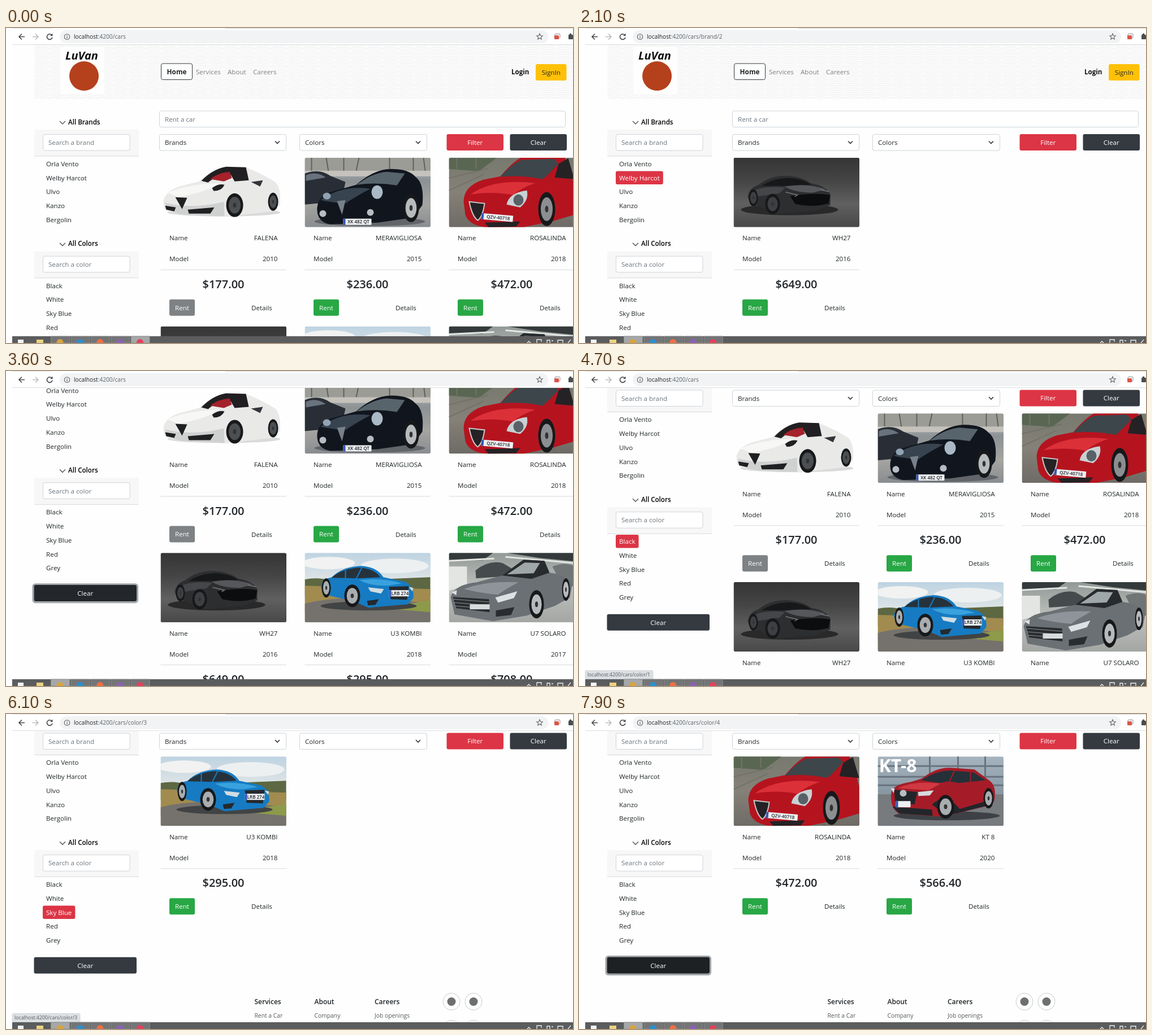
Recreate the animation shown at these times as an HTML page. Size 1003 by 558 pixels, loop 8 s.

```html
<!DOCTYPE html>
<html lang="en">
<head>
<meta charset="utf-8">
<title>Car rental</title>
<style>
  html, body { margin: 0; width: 100%; height: 100%; overflow: hidden; background: #fff; }
  svg { display: block; width: 1003px; height: 558px; font-family: "Open Sans", "Noto Sans", sans-serif; }
</style>
</head>
<body>
<svg id="stage" viewBox="0 0 1003 558" xmlns="http://www.w3.org/2000/svg"></svg>
<script>
const LOOP = 8000;
const INK = '#212529', MUTED = '#6c757d', RED = '#dc3545', DARK = '#343a40', GREEN = '#28a745';
const ROW = 24.75, CARD_W = 222.5, CARD_H = 123, PITCH = 298.7;

// Drawing helpers
const rect = (x, y, w, h, fill, r = 0, more = '') =>
  `<rect x="${x}" y="${y}" width="${w}" height="${h}" rx="${r}" fill="${fill}" ${more}/>`;
const oval = (x, y, rx, ry, fill, more = '') =>
  `<ellipse cx="${x}" cy="${y}" rx="${rx}" ry="${ry}" fill="${fill}" ${more}/>`;
const dot = (x, y, r, fill, more) => oval(x, y, r, r, fill, more);
const shape = (fill, d) => `<path d="${d}" fill="${fill}"/>`;
const line = (color, w, d) => `<path d="${d}" fill="none" stroke="${color}" stroke-width="${w}"/>`;
const text = (x, cy, s, { size = 11.6, fill = INK, weight = 400, anchor = 'start', more = '' } = {}) =>
  `<text x="${x}" y="${cy + size * 0.36}" font-size="${size}" fill="${fill}" font-weight="${weight}" text-anchor="${anchor}" ${more}>${s}</text>`;
const button = (x, y, w, label, fill, color = '#fff') =>
  rect(x, y, w, 29, fill, 3) + text(x + w / 2, y + 14.7, label, { fill: color, anchor: 'middle' });
const field = (x, y, w, label, color = MUTED) =>
  rect(x + .5, y + .5, w - 1, 28.5, '#fff', 3, 'stroke="#ced4da"') + text(x + 10, y + 15, label, { fill: color });
const chevron = (x, y, w, color, weight) =>
  line(color, weight, `M${x - w} ${y - w / 2}L${x} ${y + w / 2}L${x + w} ${y - w / 2}`);
const grad = (id, ...colors) => `<linearGradient id="${id}" x2="0" y2="1">` +
  colors.map((c, i) => `<stop offset="${i / (colors.length - 1)}" stop-color="${c}"/>`).join('') + '</linearGradient>';

const pen = document.createElement('canvas').getContext('2d');
const widthOf = s => {
  pen.font = '11.6px "Open Sans", "Noto Sans", sans-serif';
  return pen.measureText(s).width;
};

// Simplified car pictures, each 222.5 by 123
const wheel = (x, y, rx, ry, rim = '#a9adb0') =>
  oval(x, y, rx, ry, '#17181a') + oval(x, y, rx * .7, ry * .7, rim) + oval(x, y, rx * .2, ry * .2, '#333');
const plate = (x, y, w, s, turn = 0) =>
  `<g transform="translate(${x} ${y}) rotate(${turn})">` + rect(0, 0, w, 11, '#eef0f2', 1) +
  rect(0, 0, 4, 11, '#3557b5') + text(w / 2 + 2, 5.5, s, { size: 8, weight: 600, anchor: 'middle' }) + '</g>';
const back = fill => rect(0, 0, CARD_W, CARD_H, fill);

const photos = [
  () => back('#fdfefd') +
    oval(112, 97, 100, 7, '#d9dada') +
    shape('#e9e9e8', 'M5 76Q9 59 33 51L68 42Q92 20 116 16L151 17Q183 30 204 44Q214 58 211 83L197 95L121 104L44 101Q8 98 6 88Z') +
    shape('#cfd0d0', 'M8 80Q60 92 112 78L113 104L44 101Q9 98 8 80Z') +
    shape('#211f21', 'M72 41Q92 20 116 16L151 17L156 40L131 42L124 30Q98 31 84 44Z') +
    shape('#a5212b', 'M88 38Q100 27 122 25L126 36L112 42Z') +
    shape('#f7f7f6', 'M12 62Q45 47 103 45Q85 60 31 70Z') +
    shape('#1f2022', 'M26 70L47 71L38 91ZM8 85L27 88L24 95L10 92ZM48 92L95 88L88 99L50 99ZM91 54Q102 45 113 48Q108 59 94 59Z') +
    shape('#333538', 'M160 43L181 40L176 51Z') +
    wheel(131, 84, 15, 21, '#4c4f52') + wheel(199, 78, 9, 16, '#4c4f52'),
  () => back('url(#yard)') +
    rect(0, 0, CARD_W, 24, '#9b9c96') +
    line('#655f56', 2, 'M12 0V25M38 0L42 25M69 0V24M96 0L91 23M150 0V20M192 0V25M210 0L214 30') +
    rect(0, 23, CARD_W, 10, '#c4c2bb') +
    shape('#292e36', 'M0 28Q25 18 45 32L72 43L65 77L0 83Z') + shape('#69737e', 'M2 31Q20 23 37 35L2 41Z') +
    oval(115, 113, 98, 8, '#62656a') +
    shape('#11161e', 'M22 88Q24 66 52 59L91 48Q121 21 151 20Q183 19 196 34Q212 46 208 84L192 106L129 115L45 118Q20 113 22 88Z') +
    shape('#58646c', 'M92 48Q119 27 145 25L177 28L163 49Q127 43 92 48Z') +
    shape('#384350', 'M28 75Q65 48 116 55Q91 68 72 81Q45 79 28 75Z') +
    shape('#77818b', 'M57 77L72 75L66 101Z') +
    oval(128, 61, 10, 12, '#aab9c7') + oval(39, 68, 7, 6, '#91a2b3') + dot(32, 99, 6, '#b5bdc2') + dot(116, 97, 6, '#b5bdc2') +
    wheel(188, 89, 14, 25, '#b8bbbd') + plate(68, 108, 50, 'XK 482 QT'),
  () => back('url(#street)') +
    shape('#596752', 'M0 0H85L53 24L0 20Z') + line('#747168', 2, 'M0 58L61 30M0 36L70 19M14 0V22M48 0V20') +
    shape('#b5141f', 'M26 78Q26 50 61 39L91 33Q111 9 127 0H205L215 20L222 54V101L185 112L132 123H64Q35 119 29 101Z') +
    shape('#3d464a', 'M91 34Q111 11 128 4L186 2L194 10Q176 30 166 38Q126 30 91 34Z') +
    shape('#dc3039', 'M38 65Q79 36 153 45Q130 52 113 66Q75 59 38 65Z') +
    shape('#242225', 'M194 11L211 1L222 38L187 35ZM36 78L63 81Q60 104 51 111Q41 104 36 78ZM63 115L126 113L119 122L70 123Z') +
    line('#c6c7c8', 2, 'M36 78L63 81Q60 104 51 111Q41 104 36 78Z') +
    shape('#c9d0d2', 'M102 83Q106 62 138 58Q142 75 126 88Z') + oval(123, 75, 9, 10, '#596067') +
    wheel(173, 91, 15, 30, '#8c8f91') + plate(58, 98, 56, 'QZV-40718', 5),
  () => back('url(#studio)') +
    oval(99, 92, 86, 10, '#29292a') +
    shape('#2d2e30', 'M25 69Q27 54 44 48Q65 31 96 32Q122 34 136 45Q163 50 171 64L171 84L145 94L79 99L58 91L29 80Z') +
    shape('#17181a', 'M49 50Q72 35 101 36Q125 38 137 48L100 50Z') +
    shape('#56575a', 'M90 51Q130 44 163 56L140 62Q109 62 90 51Z') + shape('#444649', 'M28 62Q52 48 91 53L81 63L33 70Z') +
    shape('#0c0d0e', 'M100 68Q144 61 171 66L168 81Q140 89 109 82Z') +
    line('#77797c', 1.4, 'M92 61L113 66L108 69M154 57L169 60') +
    wheel(69, 82, 13, 18, '#3d3f42') + wheel(35, 71, 8, 15, '#3d3f42'),
  () => back('url(#sky)') +
    oval(42, 18, 47, 11, '#f1f2f1') + oval(159, 23, 60, 13, '#edf0f1') +
    shape('#5d6742', 'M0 47Q24 42 49 50L222 43V77H0Z') + shape('#a18b4f', 'M0 58L222 64V94L0 105Z') +
    shape('#75726d', 'M0 90Q68 71 222 90V123H0Z') + shape('#8d9a4a', 'M138 98L222 84V105Z') +
    oval(113, 94, 85, 8, '#414344') +
    shape('#167bc2', 'M28 58Q34 45 48 43Q65 25 99 23Q127 24 139 43L177 51Q194 59 192 80L182 91L113 97L87 86L33 73Z') +
    shape('#26323b', 'M47 44Q66 28 95 26Q122 27 134 43L93 45Z') + line('#167bc2', 2, 'M72 28V45M101 26L91 46') +
    shape('#39a1dd', 'M96 48Q137 43 172 54L147 58Q116 59 96 48Z') +
    shape('#25292d', 'M149 60L184 59L181 83L152 82ZM110 85L131 82L125 92L112 93Z') +
    shape('#d0dce2', 'M112 61L140 64L135 72L116 68ZM184 60L192 62L190 68Z') +
    wheel(84, 76, 14, 20) + wheel(38, 62, 8, 17) + plate(149, 66, 35, 'LRB 274'),
  () => back('url(#hall)') +
    shape('#343a3b', 'M0 0H78L60 13H0ZM103 0H222V15L161 9Z') + line('#e4e6e3', 3, 'M0 14L80 10M100 7L222 18') +
    shape('#454a4c', 'M47 31Q70 12 95 18L117 31L106 41L48 45Z') + shape('#707576', 'M183 24Q207 15 222 24V60L198 54Z') +
    shape('#e3e5e2', 'M0 24H32V57L0 67Z') +
    shape('#6b7075', 'M3 78Q10 56 49 52L94 40L132 12L169 14L177 35Q209 38 218 57L214 79L187 94L138 111L78 121L10 109Z') +
    shape('#272b2e', 'M94 40L132 12L169 14L178 35L146 46Z') + shape('#9fa7a9', 'M103 38L134 17L161 18L150 36Z') +
    shape('#8e9499', 'M27 64Q64 49 123 52Q100 64 87 74Q54 71 27 64Z') +
    shape('#2a2d30', 'M7 78L71 82L72 105L13 98ZM83 102L116 96L110 110L83 113Z') +
    line('#8d9296', 1, 'M8 82L71 87M9 88L71 93M11 94L72 99') +
    shape('#dce2e4', 'M82 79L121 68L115 80L87 88ZM5 70L14 66L13 75Z') + rect(37, 91, 35, 9, '#d8dbdc') +
    wheel(155, 91, 13, 25, '#b7babc') + wheel(207, 65, 7, 20, '#b7babc'),
  () => back('url(#city)') +
    line('#687480', 3, 'M0 17H222M0 36H222M0 51H222M92 0V55M142 0V40M190 0V58') + rect(0, 67, CARD_W, 56, '#777b7e') +
    text(2, 16, 'KT-8', { size: 32, fill: '#fff', weight: 700 }) + oval(122, 105, 94, 8, '#3d4145') +
    shape('#a51c28', 'M24 63Q29 49 59 45L78 39Q104 18 130 20L171 23L198 43Q211 53 206 79L192 88L115 107L37 101Q21 91 24 63Z') +
    shape('#263039', 'M77 42Q105 24 131 25L169 28L191 42L144 47L125 44L109 47Z') + line('#a51c28', 2, 'M136 24L126 46M164 27L164 46') +
    shape('#d03842', 'M35 56Q66 42 111 48L90 60Z') +
    shape('#22262a', 'M29 59L70 63L65 85L31 81ZM26 89L96 94L97 105L38 101ZM96 85Q120 62 145 93L192 79L194 87L121 105Z') +
    dot(45, 65, 6, '#b9bec2') + shape('#d6dbdf', 'M71 63L99 60L92 69L72 70ZM23 56L30 57L28 65Z') +
    wheel(120, 89, 15, 21) + wheel(196, 74, 9, 18) + plate(32, 79, 26, ''),
  () => back('url(#yard)') +
    oval(112, 101, 92, 8, '#55585b') +
    shape('#15181c', 'M20 70Q32 51 66 48Q91 23 132 24Q164 27 182 49Q207 56 205 84L187 98L44 103Q19 98 20 70Z') +
    shape('#53606a', 'M70 48Q94 28 130 28L166 47L112 52Z') + shape('#3a4046', 'M31 63Q64 50 108 57L84 68Z') +
    wheel(84, 90, 13, 18) + wheel(182, 84, 11, 17)
];

const cars = [
  ['FALENA', 2010, '177.00'], ['MERAVIGLIOSA', 2015, '236.00'], ['ROSALINDA', 2018, '472.00'],
  ['WH27', 2016, '649.00'], ['U3 KOMBI', 2018, '295.00'], ['U7 SOLARO', 2017, '708.00'],
  ['KT 8', 2020, '566.40'], ['BG 500', 2019, '944.00']
];
const brands = ['Orla Vento', 'Welby Harcot', 'Ulvo', 'Kanzo', 'Bergolin'];
const colors = ['Black', 'White', 'Sky Blue', 'Red', 'Grey'];
const all = cars.map((_, i) => i);

// Each step keeps the earlier values and changes a few
const steps = [
  [0, { path: '', list: all, scroll: 0, brand: -1, color: -1, overBrand: -1, overColor: -1,
        busy: false, bubble: '', bubbleW: 120, clear: DARK, ring: false, task: 4 }],
  [500, { overBrand: 1 }],
  [700, { path: '/brand/2', brand: 1, busy: true, bubble: 'brand/2', bubbleW: 350, task: 0 }],
  [1000, { busy: false, list: [3] }],
  [1700, { overBrand: 2, bubble: 'brand/3' }],
  [1800, { bubbleW: 120 }],
  [1900, { bubble: '' }],
  [2100, { overBrand: -1 }],
  [2700, { scroll: 120 }],
  [2800, { scroll: 206.3 }],
  [3200, { clear: '#23272b' }],
  [3400, { ring: true, busy: true, path: '', brand: -1 }],
  [3600, { busy: false, list: all }],
  [4100, { scroll: 190, clear: DARK }],
  [4200, { scroll: 166 }],
  [4300, { scroll: 154.5, overColor: 1 }],
  [4500, { overColor: 0 }],
  [4700, { ring: false, bubble: 'color/1' }],
  [4800, { path: '/color/1', color: 0, busy: true }],
  [4900, { busy: false, list: [1, 3, 7], overColor: 1, bubble: 'color/2' }],
  [5400, { path: '/color/2', color: 1, list: [] }],
  [5500, { list: [0] }],
  [5700, { overColor: 2, bubble: 'color/3' }],
  [6000, { path: '/color/3', color: 2, list: [] }],
  [6100, { list: [4] }],
  [6800, { overColor: 3, bubble: 'color/4' }],
  [6900, { path: '/color/4', color: 3, list: [] }],
  [7000, { list: [2, 6] }],
  [7200, { overColor: 4, bubble: 'color/5' }],
  [7300, { overColor: -1 }],
  [7500, { clear: '#2b3035' }],
  [7600, { clear: '#23272b' }],
  [7700, { bubble: '' }],
  [7900, { color: -1, clear: '#1d2124', ring: true }]
];
const stateAt = t => Object.assign({}, ...steps.filter(([at]) => at <= t).map(([, change]) => change));

const defs = '<defs>' +
  grad('yard', '#b8c3c9', '#8d9294', '#a5a5a1', '#898c90') + grad('street', '#77796f', '#858178', '#6e6a65') +
  grad('studio', '#353536', '#454546', '#606061', '#484849') + grad('sky', '#bed3e2', '#e6e9e7', '#a8a87e') +
  grad('hall', '#929996', '#bdc0bc', '#a4a6a4') + grad('city', '#a6b4be', '#8999a4', '#777f85') +
  '<pattern id="waves" width="28" height="8" patternUnits="userSpaceOnUse">' + rect(0, 0, 28, 8, '#fafbfa') +
  line('#f0f1f0', 1, 'M0 3q7-3 14 0t14 0M0 7q7-3 14 0t14 0') + '</pattern>' +
  '<clipPath id="view">' + rect(11, 30, 992, 516, '#000') + '</clipPath>' +
  '<clipPath id="photo">' + rect(0, 0, CARD_W, CARD_H, '#000', 3) + '</clipPath>' +
  photos.map((p, i) => `<g id="car${i}" clip-path="url(#photo)">${p()}</g>`).join('') + '</defs>';

function header() {
  const link = (x, s) => text(x, 78, s, { fill: '#7f8180' });
  return rect(50, 30, 953, 96, 'url(#waves)') + rect(96, 34, 78, 83, '#fdfefd') +
    text(134, 49, 'LuVan', { size: 20, weight: 700, fill: '#111', anchor: 'middle', more: 'font-style="italic"' }) +
    dot(138, 85, 26, '#b5401c') +
    rect(274.5, 63, 55, 28.5, '#fdfefd', 3, `stroke="${DARK}"`) +
    text(302, 77.5, 'Home', { size: 11.8, weight: 700, anchor: 'middle' }) +
    link(336, 'Services') + link(392, 'About') + link(437, 'Careers') +
    text(894, 78, 'Login', { weight: 700, fill: '#111' }) + button(937, 64, 54.5, 'SignIn', '#ffc107', INK);
}

function picker(top, title, hint, names, chosen, over) {
  return chevron(100, top + 1, 5, '#555', 1.4) + text(110, top, title, { weight: 600, fill: '#000' }) +
    rect(50, top + 13.5, 185, 46.5, '#f7f7f7') + rect(50, top + 60, 185, 1, '#d9dadb') +
    field(65, top + 21.5, 154.5, hint) +
    names.map((s, i) => {
      const y = top + 74.2 + i * ROW, hot = i === chosen || i === over;
      return (hot ? rect(65, y - 12, widthOf(s) + 12, 23.5, RED, 3) : '') +
        text(71, y, s, { fill: hot ? '#fff' : INK });
    }).join('');
}

function card(id, slot) {
  const [name, year, price] = cars[id];
  const pair = (y, k, v) => text(15.5, y, k) + text(207, y, v, { anchor: 'end' });
  return `<g transform="translate(${273.5 + slot % 3 * 255} ${229.8 + Math.floor(slot / 3) * PITCH})">` +
    `<use href="#car${id}"/>` + pair(142.5, 'Name', name) + pair(179.5, 'Model', year) +
    rect(0, 198, CARD_W, 1, '#d9dadb') +
    text(111, 224, '$' + price, { size: 20, weight: 600, anchor: 'middle' }) +
    button(15.5, 251, 45, 'Rent', id ? GREEN : '#7f8284') + text(160.5, 266, 'Details') + '</g>';
}

function footer() {
  const column = (x, title, ...rows) => text(x, 664, title, { size: 12, weight: 600 }) +
    rows.map((s, i) => text(x, 689 + i * 17, s, { size: 10.3, fill: '#55595c' })).join('');
  const badge = (x, y) => dot(x, y, 15, '#fdfefd', 'stroke="#c9cacb"') + dot(x, y, 7.5, '#6d6f70');
  return column(439.5, 'Services', 'Rent a Car', 'Delivery', 'Insurance') +
    column(545.5, 'About', 'Company', 'Team', 'Legacy') +
    column(652, 'Careers', 'Job openings', 'Employee', 'success', 'Benefits') +
    badge(788, 664) + badge(827, 664) + badge(788, 712) + badge(827, 712) +
    text(775.5, 746, 'LuVan © 2021', { size: 10.3, fill: '#6d6f70' });
}

function page(s, t) {
  const ring = s.ring ? rect(48, 584, 184.5, 32, 'none', 4, 'stroke="#a1a4a7" stroke-width="3"') : '';
  const spinner = `<g transform="translate(606 519) rotate(${Math.floor(t / 100) * 48})">` +
    line(MUTED, 4, 'M0-17A17 17 0 1 0 17 0') + '</g>';
  return `<g clip-path="url(#view)"><g transform="translate(0 ${-s.scroll})">` + header() +
    picker(166.5, 'All Brands', 'Search a brand', brands, s.brand, s.overBrand) +
    picker(382.2, 'All Colors', 'Search a color', colors, s.color, s.overColor) +
    ring + button(49.5, 585.3, 181.5, 'Clear', s.clear) +
    field(271, 146.5, 719, 'Rent a car') +
    field(271, 188, 225, 'Brands', INK) + chevron(480, 202.5, 4, DARK, 1.7) +
    field(519, 188, 226, 'Colors', INK) + chevron(729, 202.5, 4, DARK, 1.7) +
    button(779.5, 188, 100.5, 'Filter', RED) + button(891.5, 188, 100.5, 'Clear', DARK) +
    (s.busy ? spinner : s.list.map(card).join('')) +
    (s.list.length > 3 && !s.busy ? '' : footer()) + '</g></g>';
}

function toolbar(path) {
  const star = Array.from({ length: 10 }, (_, i) => {
    const a = i * Math.PI / 5, r = i % 2 ? 2.5 : 5.5;
    return `${944 + Math.sin(a) * r} ${15.5 - Math.cos(a) * r}`;
  }).join('L');
  return rect(0, 0, 1003, 30, '#fff') + rect(11, 0, 69, 1, '#dee1e6') + rect(388, 0, 615, 1, '#d3d6da') +
    rect(11, 29, 992, 1, '#dcdedf') + rect(95, 4, 864, 23, '#f1f3f4', 11.5) +
    line('#45484b', 1.6, 'M33 15.5H23M28 10.5L23 15.5L28 20.5') +
    line('#b9bcbe', 1.6, 'M47 15.5H57M52 10.5L57 15.5L52 20.5') +
    line('#45484b', 1.6, 'M81 12.5A4.8 4.8 0 1 0 82 16.5') + shape('#45484b', 'M82.5 9.5V14H78Z') +
    dot(108, 15.5, 4.8, 'none', 'stroke="#5f6368" stroke-width="1.1"') + rect(107.4, 14.5, 1.2, 3.7, '#5f6368') + rect(107.4, 12.3, 1.2, 1.2, '#5f6368') +
    text(120, 15.5, `localhost<tspan fill="#5f6368">:4200/cars${path}</tspan>`, { size: 10.2, fill: '#202124' }) +
    line('#5f6368', 1.1, `M${star}Z`) +
    rect(971, 10.5, 9, 7, '#fff', 1, 'stroke="#8a8d90"') + rect(970, 13, 8, 7, '#d9574b', 1) +
    rect(995, 12, 8, 8, '#4a4d50', 1) + dot(998.5, 11.5, 2, '#4a4d50');
}

function taskbar(active) {
  const tabs = ['#d8a43c', '#2b8fd0', '#ee7043', '#8b61b5', '#e4405f'];
  return rect(11, 546, 992, 12, '#5b5c5e') +
    rect(21, 552, 10, 6, '#f4f4f4') + rect(54, 552, 12, 6, '#ecd27f') +
    tabs.map((c, i) => rect(79.5 + i * 35.4, 546, 33, 12, i === active ? '#a6a7a8' : '#737476', 0, 'stroke="#8b8c8e"') +
      dot(95.5 + i * 35.4, 557, 6, c)).join('') +
    line('#eee', 1.3, 'M922 558L925 555L928 558M939 558V552H947V556M957 558V553H962V558M965 554H968M976 558V553H985V558M994 558L999 552');
}

function bubble(tail, w) {
  return tail && rect(11, 530.5, w, 15.5, '#dcdfe2', 2, 'stroke="#c9ccd0" stroke-width=".6"') +
    text(15, 538, 'localhost:4200/cars/' + tail, { size: 8.75, fill: '#55595e' });
}

const stage = document.getElementById('stage');
stage.innerHTML = defs + '<g id="scene"></g>';
const scene = document.getElementById('scene');
let shown = -1;

function tick() {
  const t = performance.now() % LOOP, beat = Math.floor(t / 100);
  if (beat !== shown) {
    shown = beat;
    const s = stateAt(t);
    scene.innerHTML = rect(11, 30, 992, 516, '#fdfefd') + page(s, t) +
      toolbar(s.path) + bubble(s.bubble, s.bubbleW) + taskbar(s.task);
  }
  requestAnimationFrame(tick);
}
tick();
</script>
</body>
</html>
```
